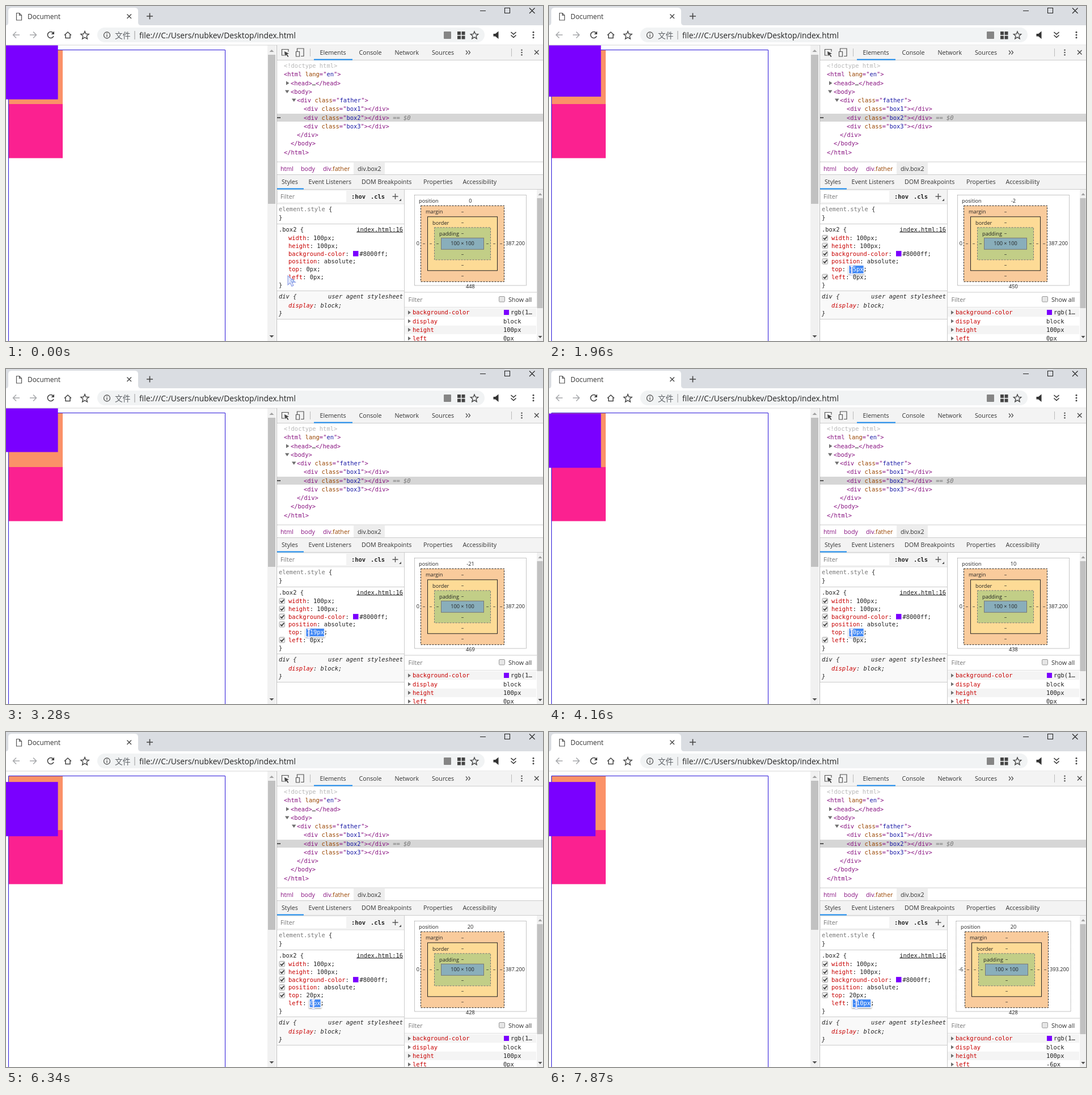
Recreate the animation shown at these times as an HTML page. Size 947 px wide and 591 px high, loop 8 s.

```html
<!DOCTYPE html>
<html lang="en">
<head>
<meta charset="utf-8">
<title>Absolute positioning in the inspector</title>
<style>
html, body { margin: 0; width: 100%; height: 100%; overflow: hidden; background: #fff; }
svg { display: block; width: 100%; height: 100%; }
text { font: 10.7px "Open Sans", "Noto Sans", sans-serif; fill: #333; white-space: pre; }
.code { font: 10.45px "DejaVu Sans Mono", "Noto Sans Mono", monospace; fill: #222; }
.bold { font-weight: bold; }
.it { font-style: italic; }
.box { font-size: 9.2px; fill: #222; }
.mid { text-anchor: middle; }
.end { text-anchor: end; }
.tab { font-size: 11.9px; }
.url { font-size: 13.8px; fill: #222; }
.cjk { font: 13.8px "Noto Sans CJK SC", "Noto Sans CJK", sans-serif; fill: #5f6368; }
.soft { fill: #777; }
.tag { fill: #881280; }
.attr { fill: #994500; }
.val { fill: #1a1aa6; }
.prop { fill: #c80000; }
</style>
</head>
<body>
<svg id="stage" viewBox="0 0 947 591" preserveAspectRatio="none"></svg>
<script>
const LOOP = 8000, SCALE = 0.957, PURPLE = '#7a00ff';

// [time, declared value, value in the box diagram]
const topSteps = [
  [0, 0, 0], [1300, -1, 0], [1520, -1, -1], [1960, -5, -2], [2190, -10, -7],
  [2400, -15, -12], [2620, -20, -17], [2840, -23, -23], [3280, -19, -21],
  [3520, -11, -14], [3740, -4, -6], [3960, 4, 2], [4160, 10, 10],
  [4380, 16, 14], [4600, 20, 20]
];
const leftSteps = [[0, 0, 0], [7220, -1, -1], [7650, -6, -3], [7870, -10, -6]];
// [time, x, y, shape]
const cursorSteps = [
  [0, 497, 476, 'arrow'], [210, 516, 473, 'arrow'], [430, 534, 467, 'beam'],
  [5020, 522, 463, 'beam'], [5240, 506, 461, 'beam'], [5460, 508, 470, 'arrow'],
  [5680, 527, 475, 'arrow'], [5910, 542, 481, 'beam']
];
const modeSteps = [[0, 'idle'], [210, 'hover'], [650, 'top'], [5460, 'hover'], [6120, 'left']];

const at = (steps, t) => steps.filter(s => s[0] <= t).pop();
const rect = (x, y, w, h, fill, more = '') =>
  `<rect x="${x}" y="${y}" width="${w}" height="${h}" fill="${fill}" ${more}/>`;
const path = (d, stroke, width = 1, fill = 'none') =>
  `<path d="${d}" stroke="${stroke}" stroke-width="${width}" fill="${fill}"/>`;
const shape = (d, fill) => path(d, 'none', 0, fill);
const text = (x, y, s, cls = '') => `<text x="${x}" y="${y}" class="${cls}">${s}</text>`;
const code = (x, y, s, cls = '') => text(x, y, s, 'code ' + cls);
const span = (cls, s) => `<tspan class="${cls}">${s}</tspan>`;
const dots = (x, y, gap, r, fill) =>
  [-gap, 0, gap].map(d => `<circle cx="${x}" cy="${y + d}" r="${r}" fill="${fill}"/>`).join('');
const hline = (x, y, w, fill = '#ccc') => rect(x, y, w, 1, fill);

function tag(name, cls) {
  const attr = cls ? ` ${span('attr', 'class')}="${span('val', cls)}"` : '';
  return span('tag', `&lt;${name}${attr}&gt;`);
}
const close = name => span('tag', `&lt;/${name}&gt;`);

function star(x, y, r) {
  let d = '';
  for (let i = 0; i < 10; i++) {
    const a = Math.PI * (i / 5 - 0.5), k = i % 2 ? r * 0.45 : r;
    d += `${i ? 'L' : 'M'}${x + k * Math.cos(a)} ${y + k * Math.sin(a)}`;
  }
  return path(d + 'Z', '#444', 1.4);
}

function page() {
  return rect(0, 69, 477, 522, '#fff') +
    path('M4.5 600V77.5H386.5V600', '#2a16d8') +
    rect(5, 78, 95, 95, '#fb9168') + rect(5, 173, 95, 95.4, '#fb2190') +
    `<rect id="moving" width="95.6" height="95.7" fill="${PURPLE}"/>` +
    rect(461, 69, 15, 522, '#f1f1f1') + rect(462, 86, 13, 263, '#c1c1c1') +
    shape('M464.5 81l4-4 4 4z', '#a0a0a0') + shape('M464.5 581l4 4 4-4z', '#505050');
}

function browser() {
  return rect(0, 0, 947, 36, '#dadde2') + rect(0, 34, 947, 35, '#fff') +
    shape('M0 34q4 0 4-5V9q0-6 6-6H227q6 0 6 6V29q0 5 5 5z', '#fff') +
    path('M18.5 12.5h5l4 4v8.5h-9zM23.5 12.5v4h4', '#555', 1.2) +
    text(38, 23, 'Document', 'tab') +
    path('M213.5 14.5l7.5 7.5m0-7.5l-7.5 7.5', '#444', 1.4) +
    path('M248 18h11M253.500 12.500v11', '#444', 1.6) +
    path('M836 8.500h10M879.500 3.500h9v9h-9zM923 3.500l9.500 9.500m0-9.500l-9.500 9.500', '#222', 1.1) +
    path('M24 51H12.500m5.500-5.500L12.500 51l5.500 5.500M42 51h11.500m-5.500-5.500l5.500 5.500-5.500 5.500', '#a6a8ab', 1.5) +
    path('M83.500 48a5.500 5.500 0 1 0 .5 5', '#444', 1.6) + shape('M85 44.500v5.500h-5.500z', '#444') +
    path('M103 51.500l6-5.500 6 5.500M105 50.500v6h8v-6', '#444', 1.5) + star(139, 52, 7.5) +
    rect(161, 38, 683, 26, '#f1f3f4', 'rx="13"') +
    '<circle cx="178" cy="51.500" r="5.500" fill="none" stroke="#555" stroke-width="1.300"/>' +
    path('M178 50.500v4M178 48v1.300', '#555', 1.4) +
    text(192, 56.5, '文件', 'cjk') + rect(226.5, 44, 1, 15, '#999') +
    text(235, 56.5, 'file:///C:/Users/nubkev/Desktop/index.html', 'url') +
    rect(772, 45, 13, 13, '#858585', 'rx="1"') +
    [[796, 45], [803.5, 45], [796, 52.5], [803.5, 52.5]].map(p => rect(...p, 6, 6, '#444')).join('') +
    star(826, 52, 7) +
    shape('M859.500 49h3.500l5.500-4.500v13.500L863 53.500h-3.500z', '#333') +
    path('M890.500 46l4.500 4 4.500-4m-9 5.500l4.500 4 4.500-4', '#333', 1.6) +
    dots(930, 51, 4.7, 1.5, '#444') + hline(0, 68.5, 947, '#d5d5d5');
}

function elements() {
  const rows = [
    [490, '<tspan fill="#b8b8b8">&lt;!doctype html&gt;</tspan>'],
    [490, span('tag', `&lt;html ${span('attr', 'lang')}="${span('val', 'en')}"&gt;`)],
    [502, tag('head') + '…' + close('head')],
    [502, tag('body')],
    [513, tag('div', 'father')],
    ...[1, 2, 3].map(n => [525, tag('div', 'box' + n) + close('div') +
      (n === 2 ? '<tspan class="it soft"> == $0</tspan>' : '')]),
    [513, close('div')], [502, close('body')], [490, close('html')]
  ];
  return rect(478, 69, 469, 522, '#fff') + rect(478, 69, 469, 26, '#f3f3f3') +
    path('M491 87h-4.500v-10.500h11.500v4', '#555', 1.2) + shape('M491 80l8 4-3.500 1 3 4-1.500 1-3-4-2 2.500z', '#444') +
    path('M513.500 80v-5h11.500v13.500h-5M511.500 80.500h6v8.500h-6z', '#555', 1.2) +
    rect(536, 75, 1, 14, '#bbb') +
    text(553.5, 86, 'Elements') + text(622.5, 86, 'Console') + text(685.5, 86, 'Network') + text(751, 86, 'Sources') +
    path('M811 78.500l3 3.500-3 3.500m4.500-7l3 3.500-3 3.500', '#555', 1.3) +
    rect(891, 75, 1, 14, '#bbb') + dots(909.5, 82, 4.2, 1.3, '#555') +
    path('M932 78l7.500 7.500m0-7.500l-7.500 7.500', '#444', 1.4) +
    hline(478, 95, 469) + rect(543, 93.5, 68, 2, '#1a8cf0') +
    rect(478, 190, 469, 14, '#d6d6d6') + code(478, 198, '…', 'bold') +
    rows.map(([x, s], i) => code(x, 109 + i * 15.25, s)).join('') +
    shape('M494 132.500l5.500 3.500-5.500 3.500zM492 148.500h7.500l-3.750 5.500zM504 163.500h7.500l-3.750 5.500z', '#6e6e6e') +
    hline(478, 274.5, 469) + rect(613, 275.5, 55, 21.5, '#ededed') +
    text(484, 290.5, 'html', 'tag') + text(0, 0, '') +
    hline(478, 297, 469) + rect(478, 298, 469, 25, '#f3f3f3') +
    text(486, 314, 'Styles') + text(533.5, 314, 'Event Listeners') + text(627, 314, 'DOM Breakpoints') +
    text(736, 314, 'Properties') + text(805.5, 314, 'Accessibility') +
    hline(478, 323, 469) + rect(478, 321.5, 47, 2, '#1a8cf0') +
    text(520, 290.5, 'body', 'tag') +
    text(559, 290.5, span('tag', 'div') + span('attr', '.father')) + text(620, 290.5, 'div.box2');
}

function styles() {
  return rect(478, 324, 224, 25, '#f3f3f3') + rect(480, 326, 120, 20, '#fff') +
    text(484, 340, 'Filter', 'soft') +
    code(609, 339.5, ':hov', 'bold') + code(643, 339.5, '.cls', 'bold') +
    path('M681.500 336h10M686.500 331v10', '#555', 1.4) + shape('M697 340v4h-4z', '#555') +
    hline(478, 348.5, 224, '#ddd') +
    code(481, 361.5, span('soft', 'element.style') + ' {') + code(481, 376.5, '}') + hline(478, 384, 224) +
    code(481, 397.5, '.box2 {') +
    code(700, 397.5, '<tspan text-decoration="underline">index.html:16</tspan>', 'end') +
    code(481, 496, '}') +
    rect(478, 503, 224, 49, '#f9f9f9') + hline(478, 502, 224) +
    code(481, 516, 'div {', 'it') + code(700, 516, 'user agent stylesheet', 'it end') +
    code(498, 531.5, span('prop', 'display') + ': block;', 'it') + code(481, 545.5, '}', 'it') +
    hline(478, 552, 224);
}

function computed() {
  const names = ['background-color', 'display', 'height', 'left'];
  return rect(702, 324, 1, 267, '#ccc') + hline(703, 504.5, 233) +
    text(709.5, 522, 'Filter', 'soft') +
    rect(869.5, 512.5, 10, 9.5, '#e6e6e6', 'stroke="#999" rx="1.500"') +
    text(886, 522, 'Show all') + hline(703, 531, 233, '#ddd') +
    names.map((name, i) => {
      const y = 540.7 + i * 15.3;
      return (i % 2 ? '' : rect(703, y - 7.6, 232, 15.2, '#f4f4f4')) +
        shape(`M709 ${y - 3.5}l5 3.5-5 3.500z`, '#6e6e6e') + code(717, y + 3.7, name, 'prop');
    }).join('') +
    rect(878, 536, 9, 9, PURPLE) + code(890, 544.4, 'rgb(1…') +
    code(877, 559.7, 'block') + code(877, 575, '100px') +
    rect(936, 324, 11, 267, '#f1f1f1') + rect(936.5, 339, 10, 194, '#c1c1c1') +
    shape('M938.500 334l3.500-4 3.500 4z', '#a0a0a0') + shape('M938.500 582l3.500 4 3.500-4z', '#505050');
}

function check(y) {
  return rect(482, y - 4.8, 9.5, 9.5, '#ececec', 'stroke="#a5a5a5" rx="1.500"') +
    path(`M484 ${y}l2.300 2.500 4-5`, '#333', 1.7);
}

function declarations(mode, top, left) {
  const list = [['width', '100px'], ['height', '100px'], ['background-color', '#8000ff'],
    ['position', 'absolute'], ['top', top + 'px'], ['left', left + 'px']];
  let out = '';
  list.forEach(([name, value], i) => {
    const y = 409.6 + i * 13.75, label = span('prop', name) + ': ';
    if (mode === name) {
      const x = 498 + (name.length + 2) * 6.29, w = value.length * 6.29;
      out += rect(x - 1.5, y - 6.5, w + 3, 15, '#fff', 'filter="url(#lift)"') +
        rect(x, y - 6.5, w, 13.5, '#3f87f5') + code(498, y + 3.6, label) +
        code(x, y + 3.6, `<tspan fill="#fff">${value}</tspan>;`);
      return;
    }
    if (mode !== 'idle') out += check(y - 0.3);
    if (i === 2) {
      out += code(498, y + 3.6, label) + rect(612, y - 5, 9.5, 9.5, PURPLE) + code(623.5, y + 3.6, value + ';');
    } else {
      out += code(498, y + 3.6, label + value + ';');
    }
  });
  return out + (mode === 'hover' ? dots(687, 492, 3.3, 1.1, '#666') : '');
}

function boxModel(top, left) {
  const grow = left < 0 ? 2 : 0, cx = 805 + grow;
  const rings = [
    ['margin', 74, 67, '#f9cb9c', '#222', '3 2'], ['border', 62, 47.5, '#fddb96', '#222', ''],
    ['padding', 50, 28.5, '#c2ce87', '#777', '3 2'], ['', 38, 10, '#89aebb', '#777', '']
  ];
  const mark = (x, y, s) => text(x, y + 3.4, s, 'box mid');
  let out = rect(720.5 - grow * 1.3, 333.5, 197 + grow * 2.6, 159.5, '#fff', 'stroke="#888" stroke-dasharray="1 1"') +
    text(728 - grow, 346.7, 'position', 'box');
  rings.forEach(([name, w, h, fill, line, dash], i) => {
    out += rect(cx - w + 0.5, 419.3 - h, w * 2 - 1, h * 2, fill, `stroke="${line}" stroke-dasharray="${dash}"`);
    if (!name) return;
    const dy = 56.5 - i * 19, dx = 68 - i * 12;
    out += text(cx - 65 + i * 12, 366.3 + i * 19.2, name, 'box');
    out += mark(cx, 419.5 - dy, '–') + mark(cx, 419.5 + dy, '–');
    out += `<g data-side="${dx}"></g>`;
  });
  [68, 56, 44].forEach(d => { out += mark(cx - d, 419, '–') + mark(cx + d, 419, '–'); });
  return out.replace(/<g data-side="\d+"><\/g>/g, '') + mark(cx, 419, '100 × 100') +
    mark(819, 343.3, top) + mark(819, 494.5, 448 - top) +
    mark(726.3, 419, left) + mark(898 + grow, 419, (387.2 - left).toFixed(3));
}

function cursor(x, y, kind) {
  if (kind === 'arrow') {
    return path(`M${x} ${y}v16l4-3.500 3 6 3-1.500-2.500-5.500h6z`, '#8f9fe6', 1.1, '#e2e8fb') +
      `<circle cx="${x + 8}" cy="${y + 8.500}" r="2.500" fill="none" stroke="#6f95e6"/>`;
  }
  const d = `M${x - 2.5} ${y - 8}h5M${x - 2.5} ${y + 7}h5M${x} ${y - 8}v15`;
  return path(d, '#aab6ee', 2.8) + path(d, '#fff', 1.3);
}

const stage = document.getElementById('stage');
const group = id => `<g id="${id}"></g>`;
stage.innerHTML = '<defs><filter id="lift" x="-30%" y="-40%" width="160%" height="200%">' +
  '<feDropShadow dx="0" dy="1" stdDeviation="1.300" flood-opacity=".5"/></filter></defs>' +
  page() + browser() + elements() + styles() + computed() +
  rect(477, 69, 1, 522, '#bbb') + group('rules') + group('model') + group('offset') + group('pointer');

const cache = {};
function put(id, html) {
  if (cache[id] === html) return;
  cache[id] = html;
  document.getElementById(id).innerHTML = html;
}

function render(t) {
  const [, top, shownTop] = at(topSteps, t), [, left, shownLeft] = at(leftSteps, t);
  const box = document.getElementById('moving');
  box.setAttribute('x', -4 + left * SCALE);
  box.setAttribute('y', 69 + top * SCALE);
  put('rules', declarations(at(modeSteps, t)[1], top, left));
  put('model', boxModel(shownTop, shownLeft));
  put('offset', code(877, 590.3, shownLeft + 'px'));
  put('pointer', cursor(...at(cursorSteps, t).slice(1)));
}

const start = performance.now();
function tick() {
  render((performance.now() - start) % LOOP);
  requestAnimationFrame(tick);
}
tick();
</script>
</body>
</html>
```
